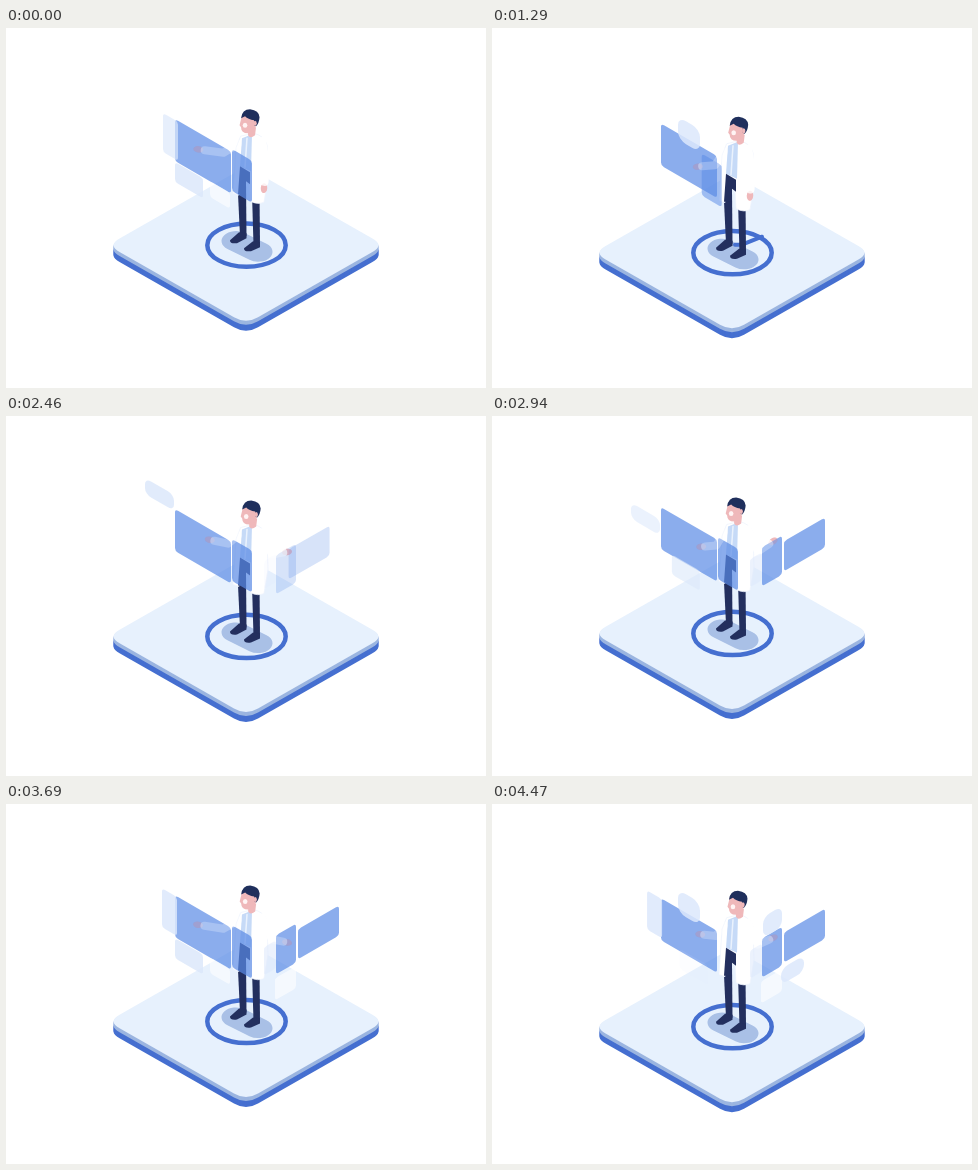
Recreate the animation shown at these times as an HTML page with a canvas. Size 480 by 360 pixels, loop 4.5 s.

```html
<!DOCTYPE html>
<html lang="en">
<head>
<meta charset="utf-8">
<style>
html, body { margin: 0; width: 100%; height: 100%; overflow: hidden; background: #fff; }
canvas { display: block; width: 480px; height: 360px; }
</style>
</head>
<body>
<canvas id="stage" width="480" height="360"></canvas>
<script>
const ctx = document.getElementById('stage').getContext('2d');
const LOOP = 4500, STEP = 30, CYCLE = 3650, RAMP = 350, SLOPE = 0.577;
const NAVY = '#232f5e', SKIN = '#efb8ba', BLUE = '#456fd0';
const GLASS = { fill: '#5b8be6', alpha: 0.7 };
const LIGHT = { fill: '#dce8fb', alpha: 0.85 };
const WHITE = { fill: '#ffffff', alpha: 0.6 };

const mix = (a, b, u) => a + (b - a) * u;
const ease = u => {
  u = Math.min(1, Math.max(0, u));
  return u * u * (3 - 2 * u);
};
const wave = (t, peak, period) => Math.cos(2 * Math.PI * (t - peak) / period);

// How present something is that peaks once per cycle and stays for 2 * half
function presence(t, peak, half) {
  const gap = (((t - peak) % CYCLE) + CYCLE) % CYCLE;
  return ease((half + RAMP / 2 - Math.min(gap, CYCLE - gap)) / RAMP);
}

function shape(fill, d) {
  ctx.fillStyle = fill;
  ctx.fill(new Path2D(d));
}

function line(color, width, d) {
  ctx.strokeStyle = color;
  ctx.lineWidth = width;
  ctx.lineCap = ctx.lineJoin = 'round';
  ctx.stroke(new Path2D(d));
}

function oval(fill, x, y, rx, ry, turn = 0) {
  ctx.fillStyle = fill;
  ctx.beginPath();
  ctx.ellipse(x, y, rx, ry, turn, 0, Math.PI * 2);
  ctx.fill();
}

function shifted(x, y, paint) {
  ctx.save();
  ctx.translate(x, y);
  paint();
  ctx.restore();
}

function drawPlatform(t) {
  const slab = 'M114 210L228 145Q240 138 252 145L366 210Q379 217 366 224L252 289Q240 296 228 289L114 224Q101 217 114 210Z';
  for (let depth = 10; depth >= 0; depth--) {
    const fill = depth > 4 ? BLUE : depth ? '#9bb5e0' : '#e7f1fd';
    shifted(0, depth, () => shape(fill, slab));
  }
  ctx.save();
  ctx.scale(1, 0.68);
  line('#a9c0e6', 29, 'M230 313L252 329');
  ctx.restore();
  ctx.strokeStyle = BLUE;
  ctx.lineWidth = 4.5;
  ctx.beginPath();
  ctx.ellipse(240.5, 217, 39.2, 21.6, 0, 0, Math.PI * 2);
  ctx.stroke();
  if (t > 1200 && t < 1400) line(BLUE, 4, 'M243 209L250 209L270 201');
}

function leftArm(t) {
  const dx = 9 * wave(t, 1000, CYCLE / 2), dy = 7 * wave(t, 1250, CYCLE / 2);
  return [221 + dx * 0.4, 126 + dy * 0.5, 201 + dx, 124 + dy];
}

function rightArm(t) {
  const raised = ease((t - 1400) / 900);
  const reach = 132 - 7 * wave(t, 2940, CYCLE / 2);
  return [mix(260, 266, raised), 135, mix(258, 281, raised), mix(160, reach, raised)];
}

function drawArm(shoulder, [ex, ey, hx, hy]) {
  const wx = mix(hx, ex, 0.25), wy = mix(hy, ey, 0.25);
  oval(SKIN, hx, hy, 5, 3.2, Math.atan2(hy - ey, hx - ex));
  line('#fff', 8, `M${shoulder}L${ex} ${ey}L${wx} ${wy}`);
}

function drawHead() {
  shape(SKIN, 'M242 99H250L249 107Q244 111 242 107Z');
  shape(SKIN, 'M236 87H250V97Q248 104 242 105Q235 105 235 99L233.5 97Z');
  shape('#1f2f5c', 'M235 90Q236 81 244 81Q253 82 253.5 89Q253 95 250 98L248 97V92Q242 91 239 88Z');
  oval(SKIN, 249, 95, 1.7, 2.5);
  oval('#fff4f4', 239, 97, 2.3, 2.5);
}

function drawDoctor(left, right, tilt) {
  drawArm('236 113', left);
  // Legs and shoes
  shape(NAVY, 'M231.5 155H240L240.500 208H234Z');
  shape(NAVY, 'M246 165H253.500L254 217H247.500Z');
  shape(NAVY, 'M233 204L240.500 205V210L231 215Q224 216 224 212Z');
  shape(NAVY, 'M247 213L254 214V219L245 223Q238 224 238 220Z');
  // Coat, shirt and trousers
  const coat = 'M235 108L247 105Q258 107 261 117L262 150L258 174Q252 177 244 173L243 155L234 152L233 167L227 165L230 120Z';
  shape('#fff', coat);
  line('#edf3fc', 0.7, coat);
  shape('#c6daf7', 'M236 110L246 106L245 143L234 138Z');
  line('#eaf2fd', 1.5, 'M241 110L239 139');
  shape(NAVY, 'M234 138L244 144V156L240 153V166H232Z');
  drawArm('256 113', right);
  shifted(tilt, 0, drawHead);
}

// A leaning screen; while absent it sits off by (dx, dy) and is transparent
function panel(tone, lean, x, y, w, h, seen = 1, { dx = 0, dy = 0, radius = 3 } = {}) {
  if (seen <= 0) return;
  ctx.save();
  ctx.globalAlpha = tone.alpha * Math.min(1, seen * 1.6);
  ctx.transform(1, lean * SLOPE, 0, 1, x + dx * (1 - seen), y + dy * (1 - seen));
  ctx.fillStyle = tone.fill;
  ctx.beginPath();
  ctx.roundRect(0, 0, w, h, radius);
  ctx.fill();
  ctx.restore();
}

function drawPanels(t) {
  const seen = (peak, half) => presence(t, peak, half);
  const sheet = seen(1040, 340), opened = ease((t - 2250) / 700);

  panel(GLASS, 1, 169, 91, 56, 42);
  panel(GLASS, 1, 226, 121, 20, 42, seen(2700, 1400), { dx: -30 });
  panel(LIGHT, 1, 154, 82, 15, 39, seen(450, 450), { dx: 6, dy: 6 });
  panel(LIGHT, 1, 139, 60, 29, 16, seen(2430, 490), { dy: 45, radius: 6 });
  panel(LIGHT, 1, 160, 102, 21, 21, seen(1980, 300), { dx: 9 });
  panel(LIGHT, 1, 169, 134, 28, 20, seen(0, 700), { dx: 20, dy: 8 });
  panel(WHITE, 1, 204, 153, 20, 16, seen(0, 500));
  panel(LIGHT, 1, 186, 81, 22, 23, sheet, { dy: 20, radius: 8 });

  panel(LIGHT, -1, 258, 143, 12, 28, opened * 0.4);
  panel(GLASS, -1, 270, 131, 20, 39, opened, { dy: 8 });
  panel(GLASS, -1, 292, 125, 41, 30, opened, { dx: -12, dy: 8 });
  panel(WHITE, -1, 269, 174, 21, 22, opened * seen(400, 600));
  panel(LIGHT, -1, 271, 109, 19, 21, opened * sheet, { dy: 10, radius: 7 });
  panel(LIGHT, -1, 289, 162, 23, 16, opened * sheet, { dy: -8, radius: 7 });
}

function draw(t) {
  const bob = 3.8 + 4.2 * wave(t, 1510, 3600);
  const left = leftArm(t), right = rightArm(t);
  ctx.fillStyle = '#fff';
  ctx.fillRect(0, 0, 480, 360);
  shifted(0, bob, () => {
    drawPlatform(t);
    drawDoctor(left, right, bob * 0.35);
  });
  shifted(0, bob * 0.6, () => drawPanels(t));
  // Sleeves showing through the glass
  shifted(0, bob, () => {
    ctx.globalAlpha = 0.25;
    drawArm('232 116', left);
    drawArm('256 116', right);
  });
}

function tick() {
  const t = performance.now() % LOOP;
  draw(Math.floor(t / STEP) * STEP);
  requestAnimationFrame(tick);
}
tick();
</script>
</body>
</html>
```
